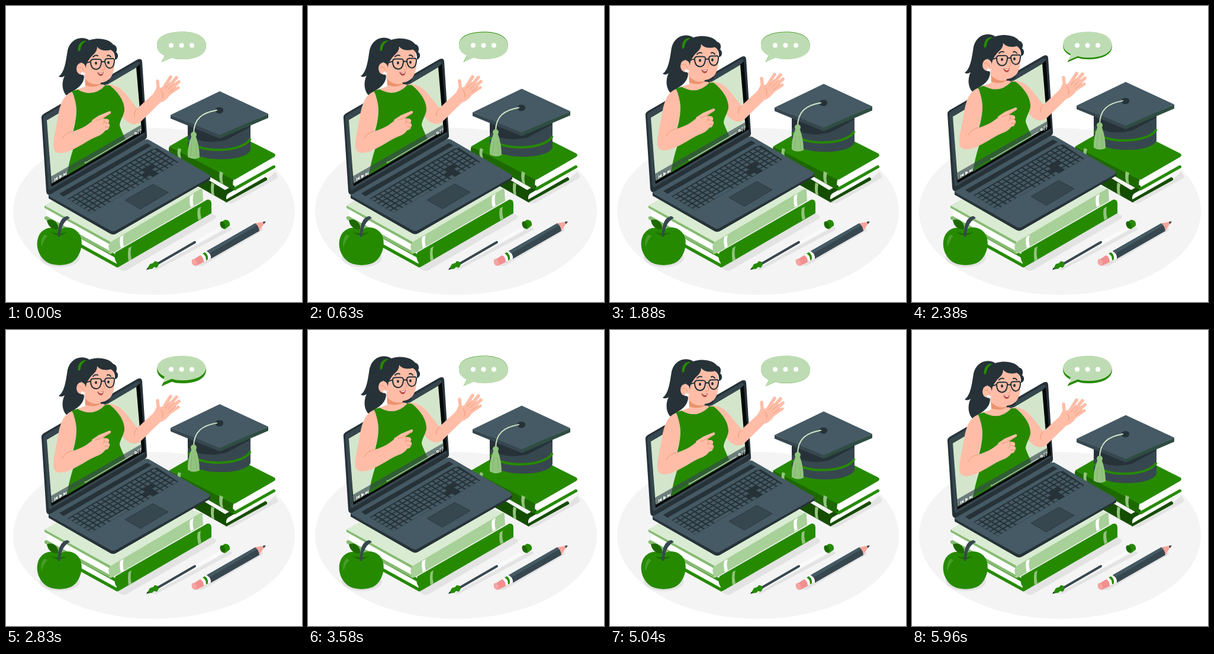
An HTML page for the animation above (6000 ms loop, 500x500 px).

```html
<!DOCTYPE html>
<html lang="en">
<head>
<meta charset="utf-8">
<title>Online lesson</title>
<style>
html, body { margin: 0; width: 100%; height: 100%; overflow: hidden; background: #fff; }
svg { display: block; width: 100vw; height: 100vh; }
.g { fill: #268a00; }
.gd { fill: #1d6900; }
.gx { fill: #154d00; }
.s1 { fill: #455a64; }
.s2 { fill: #37474f; }
.s3 { fill: #263238; }
.skin { fill: #ffbda7; }
.w { fill: #fff; }
.pale { fill: #d9ebd2; }
.mid { fill: #a8d099; }
.soft { fill: #93c47f; }
.edge { fill: #86bb72; }
.shade { fill: #e3e3e3; }
.line { fill: none; stroke-linecap: round; stroke-linejoin: round; }
.fold { stroke: #eb946f; stroke-width: 1; }
.dark { stroke: #263238; }
.finger { stroke: #ffbda7; }
</style>
</head>
<body>
<svg viewBox="0 0 500 500">
  <ellipse cx="250" cy="347" rx="238" ry="141" fill="#f4f4f4"/>

  <!-- ground shadows -->
  <g class="shade">
    <path d="M188 442L347 350L354 354Q356 357 352 360L206 445Q200 449 194 446Z"/>
    <path d="M372 332L441 292L455 280L459 287Q460 290 456 292L385 332Q379 335 372 332Z"/>
    <ellipse cx="91" cy="425" rx="34" ry="16"/>
    <path d="M247 445L375 374Q382 373 381 378L254 446Z"/>
    <path d="M322 439L433 375L434 379L332 439Z"/>
  </g>

  <!-- books under the cap -->
  <path class="gx" d="M302 270L372 312L373 332L302 292Z"/>
  <path class="w" d="M372 312L437 276L437 291L372 327Z"/>
  <path class="gx" d="M368 312L437 274V281L375 317Q370 322 373 330L368 328Z"/>
  <path class="gx" d="M370 328L438 289L441 291V294L372 332Z"/>
  <path class="soft" d="M347 298L352 301Q350 309 352 320L347 317Q345 307 347 298Z"/>
  <path class="gd" d="M276 237L385 292Q381 301 386 311L382 310L278 251Q273 245 276 237Z"/>
  <path class="w" d="M386 290L452 254Q450 264 452 269L387 307Q382 299 386 290Z"/>
  <path class="g" d="M276 237L342 199Q347 196 352 198L453 249Q457 252 453 255L387 293Q384 294 381 292Z"/>
  <path class="g" d="M384 307L452 269L455 270V273L386 312Z"/>
  <path class="soft" d="M291 240L296 242Q293 249 296 258L291 255Q288 248 291 240ZM361 279L367 282Q364 290 367 301L362 298Q359 289 361 279Z"/>

  <!-- graduation cap -->
  <g id="cap">
    <path class="s2" d="M307 196H413V243C406 265 314 265 307 238Z"/>
    <path class="s3" d="M307 196L361 220L413 196V204L372 226Q332 236 307 217Z"/>
    <path class="line" d="M308 226C320 249 400 249 413 224" stroke="#268a00" stroke-width="4" style="stroke-linecap:butt"/>
    <path class="s2" d="M278 184L361 217V224L278 190Z"/>
    <path d="M361 217L443 182V189L361 224Z" fill="#2f4d42"/>
    <path class="s1" d="M278 184L361 144L443 182L361 218Z"/>
    <path class="s3" d="M354 175V178C356 183 366 183 367 177V175Z"/>
    <ellipse class="s3" cx="360.500" cy="175" rx="6.500" ry="4"/>
    <path class="line" d="M356 176C332 180 317 190 317 216" stroke="#d0e6c6" stroke-width="2"/>
    <path class="soft" d="M313 221Q306 238 307 255Q316 261 327 256Q327 238 321 221Z"/>
    <path class="line" d="M314 232L312 254M320 232L322 254" stroke="#7fb669"/>
    <circle class="soft" cx="317" cy="217.500" r="5"/>
  </g>

  <!-- books under the laptop -->
  <path class="g" d="M90 367L188 421V427L90 373Z"/>
  <path class="w" d="M90 373L187 427L188 438L90 383Z"/>
  <path class="g" d="M90 382L188 436V442L90 388Z"/>
  <path class="g" d="M185 416L340 327Q347 326 347 334V350L190 441Q184 443 187 434Q181 425 185 416Z"/>
  <path class="soft" d="M207 409L212 406Q209 416 212 428L207 431Q205 420 207 409ZM324 342L329 339Q327 349 330 359L325 362Q322 352 324 342Z"/>
  <path class="w" d="M69 342L176 401L175 415L70 356Z"/>
  <path class="edge" d="M65 356L69 355L176 414V419L65 360Z"/>
  <path class="pale" d="M65 337L192 264L331 309L178 399Z"/>
  <path class="edge" d="M65 337L176 398V403L65 341Z"/>
  <path class="mid" d="M176 399L327 310Q332 307 332 313L333 329L179 418Q173 420 175 414Q171 406 176 399Z"/>
  <path class="w" d="M193 390L199 387Q196 395 199 406L194 409Q191 399 193 390ZM311 321L317 317Q314 327 317 337L312 340Q309 331 311 321Z"/>

  <!-- laptop with the teacher -->
  <g id="laptop">
    <path class="s3" d="M72 319V325L175 384Q181 388 187 384L345 293V288Z"/>
    <path class="s1" d="M74 317L234 226Q239 224 243 227L343 285Q346 288 342 291L186 379Q181 382 176 379L74 322Q71 319 74 317Z"/>
    <path class="s3" d="M90 317L238 232L246 236L97 322Z"/>
    <path class="s3" d="M104 326L246 242L255 240L291 264L144 350Z"/>
    <g id="keys" class="s1"></g>
    <path class="s2" d="M201 328L248 301L274 315L227 343Z" stroke="#263238" stroke-width=".8"/>

    <path class="s3" d="M60 190Q59 185 64 182L221 91Q229 87 230 94L238 218Q239 223 234 226L77 317Q69 322 68 313Z"/>
    <path class="s2" d="M63 190Q63 186 67 184L221 95Q225 93 226 98L234 217L76 310Q73 312 72 308Z"/>
    <path d="M70 192L220 104L226 98L235 213L77 305L76 299Z" fill="#050808"/>
    <path d="M69 193L220 104L229 211L77 300Z" fill="#d3e6cc"/>

    <!-- hair behind -->
    <path class="s3" d="M140 57C124 49 108 58 104 75C101 94 99 112 89 119Q94 122 99 118C93 130 95 145 103 152C112 142 131 138 132 119C126 109 122 84 140 57Z"/>
    <path class="g" d="M136 59C127 57 120 66 122 77L126 75C126 67 130 62 136 59Z"/>

    <!-- right arm -->
    <path class="skin" d="M168 133C184 131 193 138 202 148L222 173L247 150Q253 144 263 147L266 158L228 195C217 205 204 198 195 185Z"/>
    <path class="line fold" d="M222 173Q216 178 217 186"/>
    <path class="skin" d="M248 149C254 143 252 135 260 138L275 135L278 149Q270 161 261 163Z"/>
    <g class="line finger" stroke-width="5.500">
      <path d="M258 146L256 127"/>
      <path d="M264 142L278 120"/>
      <path d="M268 144L288 121"/>
      <path d="M271 147L292 128"/>
      <path d="M270 152L291 138" stroke-width="5"/>
    </g>
    <path class="line fold" d="M269 139L277 129M274 141L285 130M276 146L287 137M262 143Q267 149 264 155"/>

    <!-- neck and dress -->
    <path class="skin" d="M132 115L134 136Q124 140 114 143Q138 162 174 137L163 132V122Z"/>
    <path d="M134 124Q146 136 162 131Q150 140 134 134Z" fill="#eb946f"/>
    <path class="g" d="M111 144L121 141Q147 156 168 134L175 134C192 147 201 164 200 177C198 187 192 194 192 202Q195 211 203 227L103 286Q106 264 114 240L113 213Q121 186 118 167Q116 153 111 144Z"/>

    <!-- left arm -->
    <path class="skin" d="M111 145C96 151 91 168 88 186C84 209 79 226 80 239C82 252 96 249 105 246C123 239 139 226 155 220L165 211L149 191C138 202 126 208 112 212Q121 185 118 166Q116 153 111 145Z"/>
    <path class="line fold" d="M112 212Q100 214 95 224"/>
    <path class="skin" d="M145 193L157 185L174 178Q178 177 177 181L164 190L172 191Q176 194 173 198Q177 201 174 205Q173 210 168 210Q163 217 155 220Z"/>
    <path class="line fold" d="M176 182L161 190Q158 193 152 193M172 198L165 196M174 205L167 204M165 191Q168 194 164 200"/>

    <!-- head -->
    <path class="skin" d="M136 81C143 68 173 66 181 76C186 98 182 115 176 122Q166 132 153 130Q135 126 133 111Z"/>
    <path class="s3" d="M130 100C118 82 127 60 143 57C158 53 174 56 181 65C188 67 188 74 186 78C191 81 190 90 184 91Q185 78 177 74C166 77 158 74 154 69C154 80 145 82 140 91Q135 97 135 105Z"/>
    <ellipse class="skin" cx="127" cy="106" rx="8" ry="10"/>
    <path class="line fold" d="M122 104Q128 101 131 109"/>
    <circle class="w" cx="129" cy="114" r="2.500"/>
    <g class="line dark" stroke-width="2">
      <path d="M143 94Q143 90 148 90H157Q162 90 161 95Q160 107 152 107Q143 106 143 94ZM167 93Q167 89 172 89H179Q184 88 183 94Q182 105 175 105Q168 104 167 93ZM161 95Q164 93 167 95M143 94L133 97"/>
      <path d="M147 86Q151 82 155 84M171 84Q174 82 177 86"/>
    </g>
    <ellipse class="s3" cx="152" cy="96.500" rx="2" ry="2.600"/>
    <ellipse class="s3" cx="173" cy="95.500" rx="2" ry="2.600"/>
    <path class="line fold" d="M164 98L167 106Q166 109 162 108"/>
    <path d="M154 112Q160 114 165 111Q164 119 159 118Q156 117 154 112Z" fill="#b84a45"/>
    <path class="w" d="M156 113Q160 114 164 112L163 114Q159 116 156 113Z"/>
    <path class="line dark" d="M161 131Q168 131 174 126" stroke-width="3"/>

    <!-- player controls -->
    <path class="s2" d="M76 288L228 201L229 211L77 300Z" opacity=".65"/>
    <g class="w">
      <path d="M82 291L83 290.500V296L82 296.500ZM83 293L87 288V293.500ZM90 286L95 286.500L90.500 292ZM97 283L101 283L97.500 288ZM101 281L102 280.500V286L101 286.500Z"/>
      <circle cx="219" cy="215" r="1.600" fill="none" stroke="#fff" stroke-width="1.200"/>
      <path d="M223 212V210L225 209M226 208.500L227.500 208V210M223 214V216L224.500 215.500M226 215L227.500 214V212" fill="none" stroke="#fff" stroke-width=".8"/>
    </g>
    <path class="line" d="M134 265L213 219" stroke="#c6d2c6" stroke-width="1.300"/>
    <path class="line" d="M105 281L134 265" stroke="#268a00" stroke-width="1.300"/>
    <circle cx="134" cy="264.500" r="1.500" fill="#8ac56f"/>
  </g>

  <!-- apple -->
  <path class="g" d="M90 379C99 370 118 373 125 387C132 402 125 424 113 432C103 439 80 440 68 432C53 421 49 401 56 387C63 374 80 371 90 379Z"/>
  <path d="M65 386Q57 395 60 408Q63 395 70 389Z" fill="#479d29"/>
  <path class="gd" d="M76 382Q89 393 103 382Q90 386 76 382Z"/>
  <path class="gd" d="M69 362C78 358 88 364 89 377C78 379 71 372 69 362Z"/>
  <path class="s2" d="M88 390C87 371 92 356 104 355L108 358C98 363 93 373 91 390Z"/>

  <!-- pen -->
  <path class="line" d="M320 400L364 375" stroke="#fafafa" stroke-width="6"/>
  <path class="line" d="M255 436L319 399" stroke="#37474f" stroke-width="4"/>
  <path class="g" d="M238 445L243 436L249 434L251 431L256 432L258 437L255 442L250 441L247 444Z"/>
  <path class="s3" d="M237 446L239 442L242 444Z"/>
  <path class="g" d="M362 366L370 361Q379 361 378 371L370 377Q362 376 362 366Z"/>
  <ellipse class="gd" cx="366" cy="370" rx="4" ry="6.500" transform="rotate(-25 366 370)"/>

  <!-- pencil -->
  <path d="M314 430L331 419Q338 423 337 431L321 439Q313 438 314 430Z" fill="#f28f8f"/>
  <ellipse cx="318" cy="433" rx="4" ry="6" transform="rotate(-25 318 433)" fill="#f5a5a3"/>
  <path class="w" d="M328 421L340 413Q347 417 346 426L334 432Q334 424 328 421Z"/>
  <path class="g" d="M332 418L336 416Q342 420 341 428L338 430Q338 421 332 418Z"/>
  <path class="s2" d="M339 414L421 367Q428 371 428 380L346 427Q347 418 339 414Z"/>
  <path class="s1" d="M339 414L421 367L425 370L344 418Z"/>
  <path d="M421 367L438 364L428 380Q427 371 421 367Z" fill="#f4a59c"/>
  <path class="s3" d="M434 364.500L439 364L435.500 368.500Z"/>

  <!-- speech bubble -->
  <defs>
    <path id="talk" d="M296 43.500C325 43 338 54 338 67C338 82 322 90 297 90Q287 90 280 87.500L262.500 95L268 84C259 79 255 74 255 66C255 53 268 44 296 43.500Z"/>
  </defs>
  <use href="#talk" class="g"/>
  <use href="#talk" id="tint" class="w" opacity=".7"/>
  <g class="w">
    <circle cx="279" cy="66.500" r="4"/>
    <circle cx="296.500" cy="66.500" r="4"/>
    <circle cx="314" cy="66.500" r="4"/>
  </g>
</svg>
<script>
const el = id => document.getElementById(id);

// Keyboard: rows and columns on a slanted grid
const at = (u, v) => `${(104 + 147 * u + 40 * v).toFixed(1)} ${(327 - 86 * u + 24 * v).toFixed(1)}`;
const rows = 6, cols = 18;
let keys = '';
for (let r = 0; r < rows; r++) {
  for (let c = 0; c < cols; c++) {
    if ((c === 13 && r > 2) || (c === 14 && r === 3) || (c === 12 && r === 4)) continue;
    const space = r === 5 && c > 3 && c < 8;
    if (space && c > 4) continue;
    const u = (c + .14) / cols, v = (r + .12) / rows;
    const u2 = (c + (space ? 3.86 : .86)) / cols, v2 = (r + .84) / rows;
    keys += `M${at(u, v)}L${at(u2, v)}L${at(u2, v2)}L${at(u, v2)}Z`;
  }
}
el('keys').innerHTML = `<path d="${keys}"/>`;

const LOOP = 6000, DELAY = 500;
const rise = t => 1 - Math.abs(1 - t / 3000);          // 0 → 1 → 0
const sway = t => {                                    // 0 → 1 → -1 → 0
  const p = (t / 3000 + .25) % 1;
  return 1 - 4 * Math.abs(p - .5);
};
const moveY = (id, y) => el(id).setAttribute('transform', `translate(0 ${y.toFixed(3)})`);

function draw() {
  const t = performance.now() % LOOP;
  const late = Math.max(0, t - DELAY);
  moveY('cap', -20 * rise(t));
  moveY('laptop', -10 * rise(late));
  moveY('tint', 5.5 * sway(late));
  requestAnimationFrame(draw);
}
draw();
</script>
</body>
</html>
```
